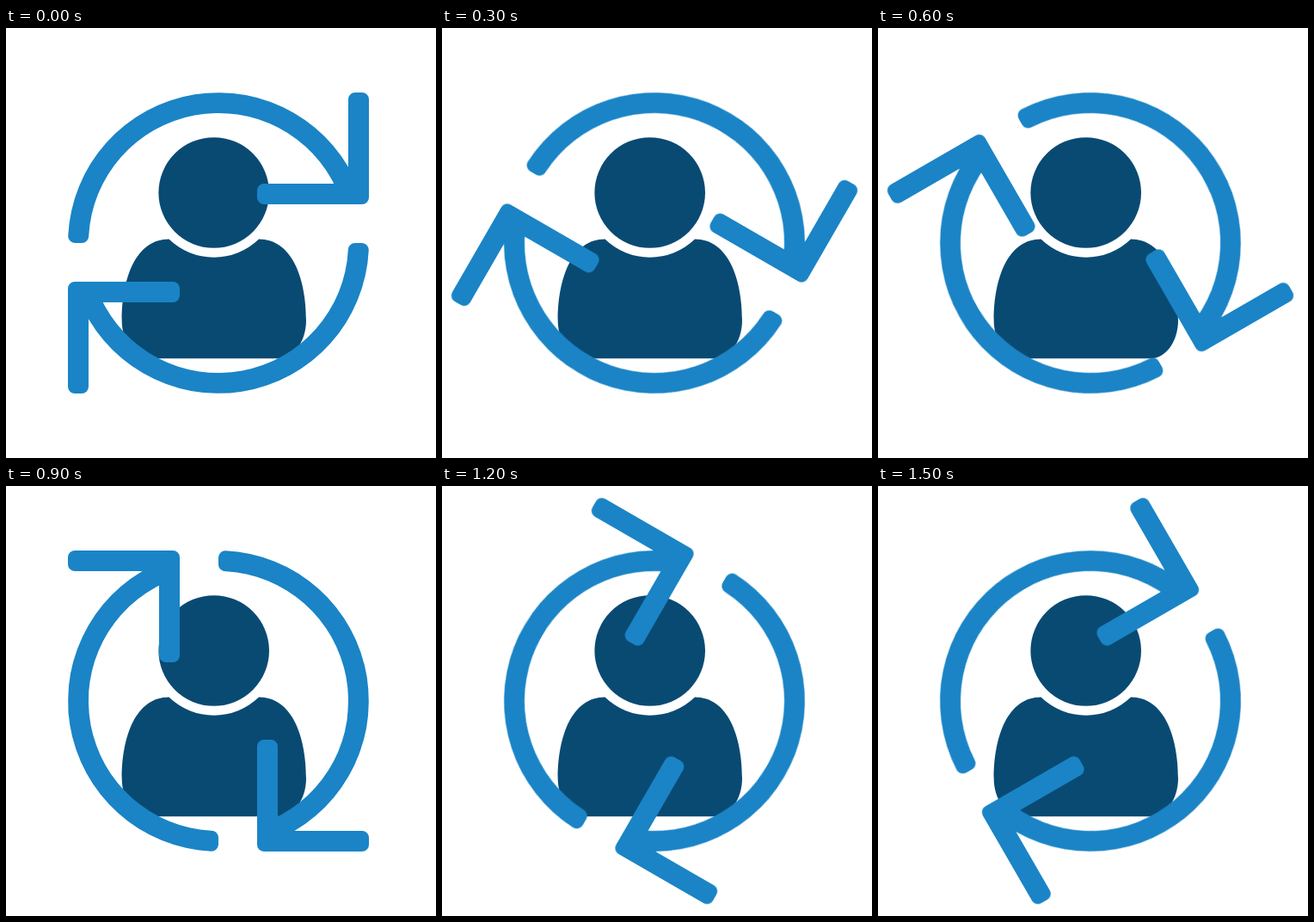
An HTML page that plays this animation: 500x500 px, repeating every 1800 ms.

```html
<!DOCTYPE html>
<html lang="en">
<head>
<meta charset="utf-8">
<title>Refresh user</title>
<style>
  html, body { margin: 0; width: 100%; height: 100%; overflow: hidden; background: #fff; }
  svg { display: block; width: 100vw; height: 100vh; }
  .user { fill: #094a73; }
  .arrows { fill: #1a84c6; transform-origin: 247px 250px; }
</style>
</head>
<body>
<svg viewBox="0 0 500 500">
  <g class="user">
    <circle cx="241.7" cy="191.5" r="64.3"/>
    <path d="M189.5 245.5A75 75 0 0 0 294 245.5C332 245.5 349 290 349 340C349 364 335 384.3 317 384.3H167C149 384.3 134.7 364 134.7 340C134.7 290 151.500 245.500 189.500 245.500Z"/>
  </g>
  <g class="arrows" id="arrows">
    <g id="arrow">
      <!-- curved shaft -->
      <path d="M72.200 242A175 175 0 0 1 410.600 188H384.700A151 151 0 0 0 96.200 242A8 8 0 0 1 88 250H80A8 8 0 0 1 72.200 242Z"/>
      <!-- head -->
      <path d="M398 181V83a8 8 0 0 1 8-8h8a8 8 0 0 1 8 8V197a8 8 0 0 1-8 8H300a8 8 0 0 1-8-8v-8a8 8 0 0 1 8-8Z"/>
    </g>
    <use href="#arrow" transform="rotate(180 247 250)"/>
  </g>
</svg>
<script>
  // Half a turn looks like a whole one, so six 30° steps close the loop.
  const STEPS = 6, STEP_MS = 300;
  document.getElementById('arrows').animate(
    { transform: ['rotate(0deg)', 'rotate(180deg)'] },
    { duration: STEPS * STEP_MS, iterations: Infinity, easing: `steps(${STEPS}, end)` }
  );
</script>
</body>
</html>
```
